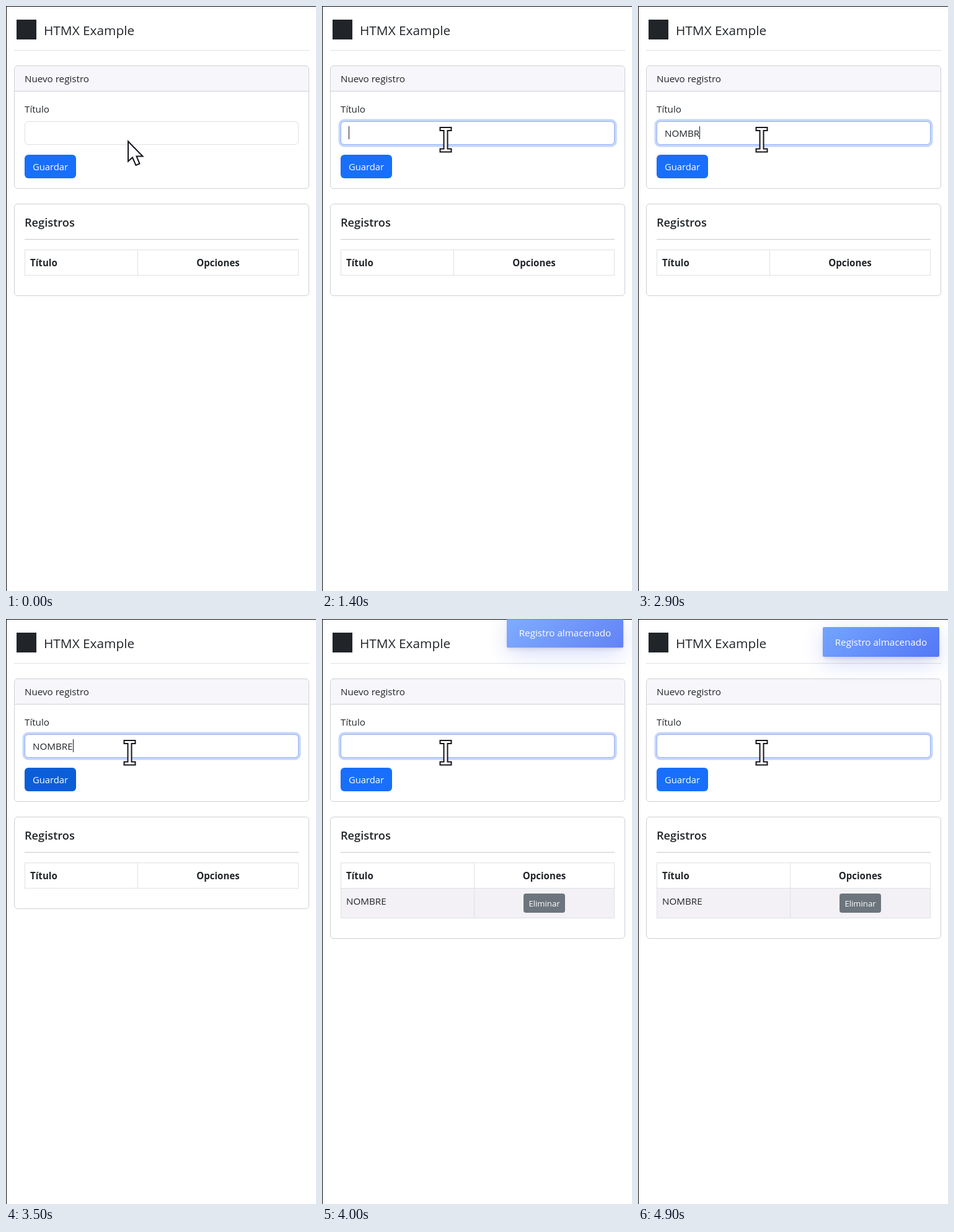
Write an HTML page that moves like this. It is 500x944 px and loops after 5000 ms.

```html
<!DOCTYPE html>
<html lang="es">
<head>
<meta charset="utf-8">
<title>HTMX Example</title>
<style>
  html, body { margin: 0; width: 100%; height: 100%; overflow: hidden; background: #fff; }
  svg { position: absolute; left: 0; top: 0; }
  svg, #toast { font: 15.2px "Open Sans", "Noto Sans", sans-serif; }
  text { fill: #212529; }
  .mid { text-anchor: middle; }
  .bold { font-weight: 700; font-size: 15.1px; }
  .white { fill: #fff; }
  .line { fill: none; stroke: #dee0e4; }
  .card { fill: none; stroke: #d0d0d3; }
  .cursor { fill: #fff; stroke: #17151d; stroke-width: 2; }
  #toast {
    position: absolute; left: 298px; top: 0; width: 188px; height: 48px;
    line-height: 48px; text-align: center; white-space: nowrap; color: #fff;
    border-radius: 2px; background: linear-gradient(135deg, #73a5ff, #5477f5);
    box-shadow: 0 3px 6px -1px rgba(0,0,0,.12), 0 10px 36px -4px rgba(77,96,232,.3);
  }
</style>
</head>
<body>
<svg width="500" height="944" viewBox="0 0 500 944">
  <path d="M0 .5H500M.5 0V944" stroke="#08080c"/>
  <rect x="17" y="22" width="32" height="32" fill="#212529"/>
  <text x="61" y="47" font-size="20.8">HTMX Example</text>
  <path class="line" d="M13 71.5H489"/>

  <path d="M14 137V102q0-5 5-5H483q5 0 5 5V137z" fill="#f7f6fa"/>
  <rect class="card" x="13.5" y="96.5" width="475" height="198" rx="5.5"/>
  <path class="card" d="M14 137.5H488"/>
  <text x="30" y="123">Nuevo registro</text>
  <text x="30" y="172">Título</text>
  <rect id="ring" x="28.5" y="184.5" width="445" height="41" rx="7.5" fill="none" stroke="#c7d5fa" stroke-width="4"/>
  <rect class="line" x="30.5" y="186.5" width="441" height="37" rx="5.5"/>
  <rect id="edge" x="30.5" y="186.5" width="441" height="37" rx="5.5" fill="none" stroke="#8fb4f5"/>
  <text id="typed" x="43" y="211"></text>
  <rect id="caret" y="194" width="1" height="21" fill="#17151d"/>
  <rect id="save" x="30" y="240" width="83" height="38" rx="6"/>
  <text class="mid white" x="71.5" y="265" font-size="14.8">Guardar</text>

  <rect id="list" class="card" x="13.5" y="319.5" width="475" rx="5.5"/>
  <text x="30" y="356" font-size="18.2" font-weight="600">Registros</text>
  <path d="M30 376.5H472" stroke="#c8c9cc"/>
  <g id="row">
    <rect x="30.5" y="434.5" width="441" height="48" fill="#f3f1f5" stroke="#dee0e4"/>
    <text x="39" y="461">NOMBRE</text>
    <rect x="325" y="443" width="67" height="31" rx="4" fill="#6c757d"/>
    <text class="mid white" x="358.5" y="464" font-size="13.1">Eliminar</text>
  </g>
  <rect class="line" x="30.5" y="393.5" width="441" height="41"/>
  <path id="split" class="line"/>
  <text class="bold" x="39" y="420">Título</text>
  <text id="options" class="bold mid" y="420">Opciones</text>

  <path id="arrow" class="cursor" d="M197 218.5V250.5L204 244.5L209.5 257L215.5 254.5L210.5 242.5H220.5z"/>
  <path id="beam" class="cursor" d="M190.5 196H208.5V201H202.5V230.5H208.5V235.5H190.5V230.5H196.5V201H190.5z"/>
</svg>
<div id="toast">Registro almacenado</div>
<script>
  const LOOP = 5000, STEP = 100;
  const KEYS = [2400, 2500, 2600, 2800, 2900, 3100];
  const BLINKS = [400, 900, 1400, 2000, 2400, 3800, 4400, 4900];
  const $ = id => document.getElementById(id);
  const set = (id, attrs) => {
    for (const name in attrs) $(id).setAttribute(name, attrs[name]);
  };
  const show = (id, on) => set(id, { visibility: on ? "visible" : "hidden" });
  const clamp = x => Math.min(1, Math.max(0, x));
  const passed = (times, t) => times.filter(at => at <= t).length;

  function draw(t) {
    show("arrow", t < 100);
    show("beam", t >= 100);
    set("beam", { transform: `translate(0 ${t < 600 ? 2 : 0})` });

    const focus = clamp((t - 300) / 200);
    set("ring", { opacity: focus });
    set("edge", { opacity: focus });

    $("typed").textContent = t < 3600 ? "NOMBRE".slice(0, passed(KEYS, t)) : "";
    set("caret", { x: Math.round(43 + $("typed").getComputedTextLength()) });
    show("caret", passed(BLINKS, t) % 2);
    set("save", { fill: t >= 3500 && t < 3600 ? "#0b5ed7" : "#186ffb" });

    const saved = t >= 3900;
    const column = saved ? 245.5 : 212.5;
    show("row", saved);
    set("list", { height: saved ? 196 : 148 });
    set("split", { d: `M${column} 393V${saved ? 483 : 435}` });
    set("options", { x: (column + 471.5) / 2 });

    const slide = 1 - (1 - clamp((t - 3780) / 400)) ** 3;
    $("toast").style.transform = `translateY(${-150 + 163 * slide}px)`;
    $("toast").style.opacity = slide;
  }

  const start = performance.now();
  function tick() {
    const t = (performance.now() - start) % LOOP;
    draw(Math.floor(t / STEP) * STEP);
    requestAnimationFrame(tick);
  }
  tick();
</script>
</body>
</html>
```
